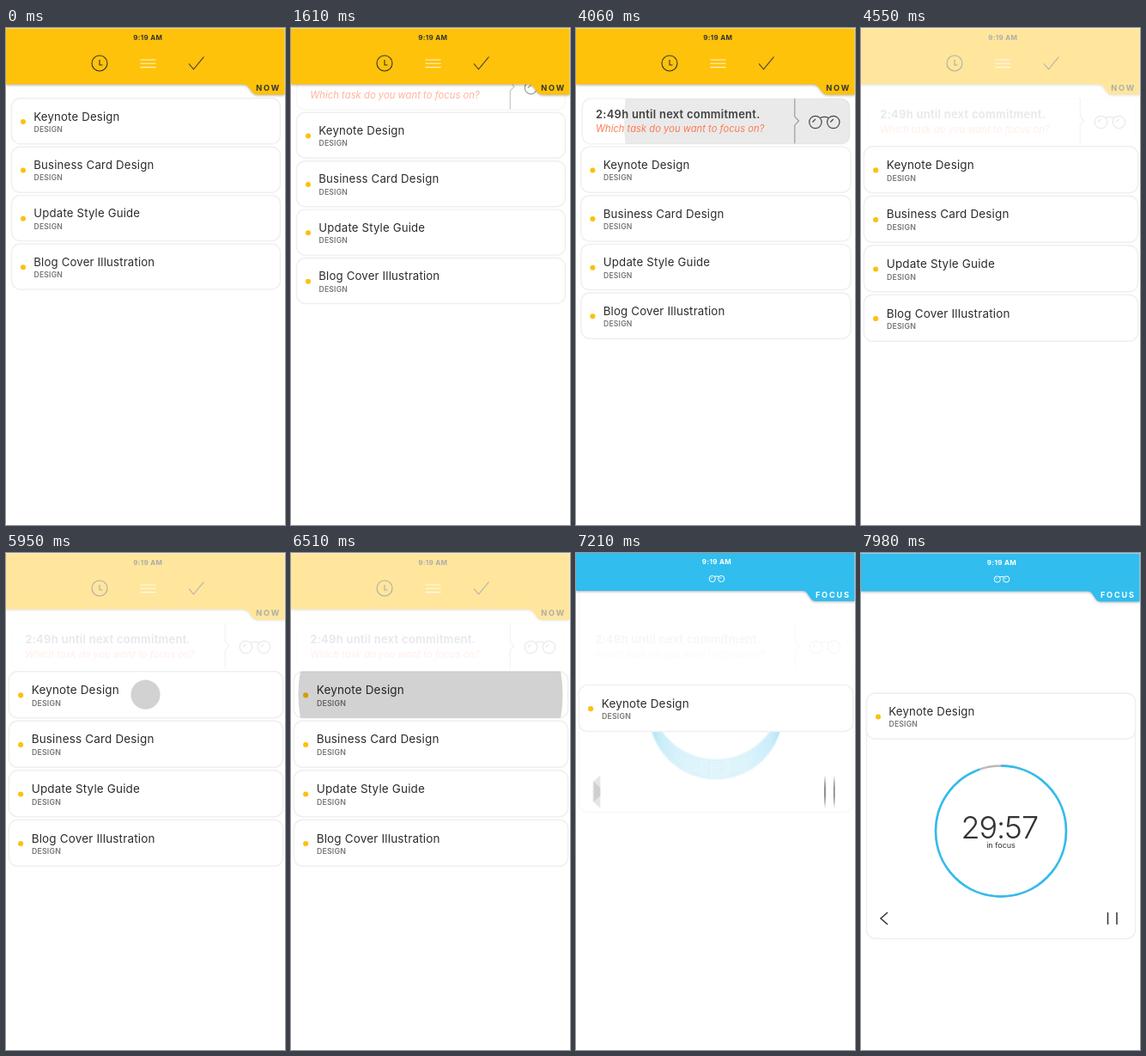
Write an HTML page that moves like this. It is 325 by 578 pixels and loops after 8000 ms.

```html
<!DOCTYPE html>
<html lang="en">
<head>
<meta charset="utf-8">
<title>Focus task</title>
<style>
  html, body { margin: 0; width: 100%; height: 100%; overflow: hidden; background: #fff; }
  svg { display: block; width: 100vw; height: 100vh; font-family: Inter, "Open Sans", sans-serif; }
  .line { fill: none; stroke: #333; stroke-width: 1.1; }
  .box { fill: #fff; stroke: #efefef; stroke-width: 1.4; }
  .title { font-size: 13.2px; letter-spacing: .18px; fill: #2b2b2b; }
  .tag { font-size: 8.6px; font-weight: 600; letter-spacing: .2px; fill: #777; }
  .clock { font-size: 8px; font-weight: 700; letter-spacing: .35px; text-anchor: middle; }
  .tab { font-size: 9.2px; font-weight: 700; letter-spacing: 1.8px; }
  .lead { font-size: 13px; font-weight: 600; letter-spacing: .28px; fill: #2b2b2b; }
  .ask { font-size: 11.2px; font-style: italic; letter-spacing: .05px; fill: #ff6a3c; }
  .time { font-size: 36px; font-weight: 300; letter-spacing: -1.1px; fill: #333; }
  .small { font-size: 9px; }
  .bar { filter: drop-shadow(0 1px 1.5px rgba(0, 0, 0, .3)); }
</style>
</head>
<body>
<svg viewBox="0 0 325 578">
  <defs>
    <g id="glasses" fill="none">
      <circle cx="-10.5" r="7.2"/><circle cx="10.5" r="7.2"/>
      <path d="M-5 -5Q0 -7.4 5 -5M-14 0L-10.5 -3.5M7 0L10.5 -3.5"/>
    </g>
    <g id="dial">
      <circle class="line" cx="163" cy="323.5" r="76" style="stroke:#bbb;stroke-width:2.4"/>
      <circle class="line" cx="163" cy="323.5" r="76" pathLength="360" stroke-dasharray="341 19"
        transform="rotate(-90 163 323.5)" style="stroke:#31bdee;stroke-width:2.6"/>
      <text class="time" x="116.5" y="331.5">29:57</text>
      <path class="line" d="M31 418L23 425L31 432M287.5 418V432M298 418V432" style="stroke-width:1.5"/>
    </g>
    <text id="label" class="small" x="163" y="343" text-anchor="middle">in focus</text>
    <clipPath id="cardClip"><rect x="6.5" y="138.2" width="313" height="53" rx="10"/></clipPath>
    <clipPath id="bannerClip"><rect x="6.5" y="82" width="313" height="53" rx="10"/></clipPath>
    <clipPath id="below"><rect y="191.6" width="325" height="400"/></clipPath>
  </defs>

  <g id="rest"></g>

  <g id="banner">
    <rect class="box" x="6.5" y="82" width="313" height="53" rx="10"/>
    <g clip-path="url(#bannerClip)"><circle id="bannerRipple" cx="290" cy="109"/></g>
    <text class="lead" x="22.3" y="105">2:49h until next commitment.</text>
    <text class="ask" x="22.3" y="121.5">Which task do you want to focus on?</text>
    <path class="line" d="M255.3 82V103L260 108L255.3 113V134.5" style="stroke:#888"/>
    <use href="#glasses" x="290" y="109.5" stroke="#333" stroke-width="1.2"/>
  </g>

  <g id="focus">
    <g id="panel">
      <rect class="box" x="6.5" y="163" width="313" height="285.5" rx="10" style="fill:none"/>
    </g>
    <g id="trail" clip-path="url(#below)"></g>
    <g id="chosen"></g>
    <g clip-path="url(#cardClip)"><circle id="cardRipple" cx="162.5" cy="164.7"/></g>
  </g>

  <g id="nowBar">
    <path class="bar" fill="#ffc20a" d="M0 .5H324.5V77.5H293Q289 77.5 286.5 74L282 68Q280 65.5 276 65.5H0Z"/>
    <text class="clock" x="165.3" y="13.5" fill="#333">9:19 AM</text>
    <circle class="line" cx="109" cy="41" r="9"/>
    <path class="line" d="M109 37V43H112.5M213 41.5L218.5 48L230.5 33.5"/>
    <path class="line" d="M156.5 37H174.5M156.5 41.3H174.5M156.5 45.6H174.5" style="stroke:#fff3cd"/>
    <text class="tab" x="291.2" y="73" fill="#333">NOW</text>
  </g>

  <g id="focusBar" fill="#fff">
    <path class="bar" fill="#31bdee" d="M0 .5H324.5V56.5H279Q275.5 56.5 273.5 53.5L269.5 47.5Q267.5 44.5 264 44.5H0Z"/>
    <text class="clock" x="164" y="14">9:19 AM</text>
    <use href="#glasses" transform="translate(164 30.5) scale(.5)" stroke="#fff" stroke-width="2"/>
    <text class="tab" x="278.9" y="52.3">FOCUS</text>
  </g>
</svg>
<script>
const LOOP = 8000, STEP = 70, PITCH = 56.4, COPIES = 13;
const TASKS = ['Keynote Design', 'Business Card Design', 'Update Style Guide', 'Blog Cover Illustration'];
const $ = id => document.getElementById(id);
const set = (el, attrs) => { for (const k in attrs) el.setAttribute(k, attrs[k]); };

const span = (t, a, b) => Math.min(1, Math.max(0, (t - a) / (b - a)));
const mix = (a, b, p) => a + (b - a) * p;
const sine = p => .5 - .5 * Math.cos(Math.PI * p);
const out = p => 1 - (1 - p) ** 3;
const zoom = (s, cy) => `translate(162.5 ${cy}) scale(${s}) translate(-162.5 ${-cy})`;

// Cards are drawn in their place below the banner.
const card = (name, i) => `<g transform="translate(0 ${i * PITCH})">
  <rect class="box" x="6.5" y="138.2" width="313" height="53" rx="10"/>
  <circle cx="20" cy="165.4" r="3" fill="#fdc00f"/>
  <text class="title" x="32.3" y="164">${name}</text>
  <text class="tag" x="32.5" y="177.4">DESIGN</text></g>`;

$('chosen').innerHTML = card(TASKS[0], 0);
$('rest').innerHTML = TASKS.slice(1).map((name, i) => `<g>${card(name, i + 1)}</g>`).join('');
$('trail').innerHTML = ['dial', 'label'].map(id => `<use href="#${id}"/>`.repeat(COPIES)).join('');
const rest = [...$('rest').children], trail = [...$('trail').children];

const panelY = t => mix(-214, 0, sine(span(t, 6930, 7630)));

// Copies spread along the path give the panel its motion blur.
function drawPanel(t) {
  const y = panelY(t);
  const blur = .72 * (y - panelY(t - STEP));
  const shown = t > 6930;
  const alpha = Math.max(.11, 1 - blur / 10);
  set($('panel'), { transform: `translate(0 ${y - 25})`, opacity: span(t, 6930, 7560) });
  trail.forEach((copy, n) => {
    const k = n % COPIES - (COPIES - 1) / 2;
    const lag = n < COPIES ? 1 : .58;
    const visible = shown && (blur > .5 || k === 0);
    set(copy, {
      transform: `translate(0 ${y * lag - 25 + k * blur / (COPIES - 1)})`,
      opacity: alpha,
      display: visible ? 'inline' : 'none'
    });
  });
  const g = Math.round(mix(255, 51, span(t, 7210, 7560)));
  set($('label'), { fill: `rgb(${g},${g},${g})` });
}

function draw(time) {
  const t = Math.floor(time / STEP) * STEP;
  const drop = PITCH * (sine(span(t, 1330, 2100)) - 1);
  const grow = 1 + .02 * sine(span(t, 3850, 4550));
  const dim = sine(span(t, 4060, 4550));

  // Banner: enters, is pressed, then fades back.
  const press = span(t, 3780, 4060) - span(t, 4060, 4340);
  set($('banner'), {
    transform: `translate(0 ${drop}) ${zoom(1 - .005 * press, 108.5)}`,
    opacity: span(t, 1330, 1890) * mix(1, .1, sine(span(t, 3920, 4550))) * (1 - span(t, 6720, 7490))
  });
  set($('bannerRipple'), {
    r: 234.5 * Math.max(0, t - 3430) / 630,
    opacity: .18 * (1 - span(t, 3850, 4270))
  });

  // Remaining tasks leave to the left one after another.
  set($('rest'), { transform: `translate(0 ${drop}) ${zoom(grow, 164.7)}` });
  rest.forEach((el, i) => {
    const p = span(t, 6580 + 70 * i, 7000 + 70 * i);
    set(el, { transform: `translate(${-330 * p * p} ${8 * p})`, opacity: 1 - p });
  });

  const settle = sine(span(t, 7490, 7980));
  const fall = 25 * sine(span(t, 6720, 7560));
  set($('focus'), {
    transform: `translate(0 ${drop + fall}) ${zoom(mix(grow, 1, settle), 164.7)}`
  });
  set($('cardRipple'), {
    r: 151 * Math.max(0, t - 5880) / 630,
    opacity: .176 * (1 - span(t, 6510, 6790))
  });
  drawPanel(t);

  const swap = out(span(t, 6650, 7350));
  set($('nowBar'), {
    transform: `translate(0 ${-21 * swap})`,
    opacity: mix(1, .4, dim) * (1 - span(t, 6580, 7000))
  });
  set($('focusBar'), { transform: `translate(0 ${-64 * (1 - swap)})` });
}

let start;
function tick(now) {
  start ??= now;
  draw((now - start) % LOOP);
  requestAnimationFrame(tick);
}
draw(0);
requestAnimationFrame(tick);
</script>
</body>
</html>
```
